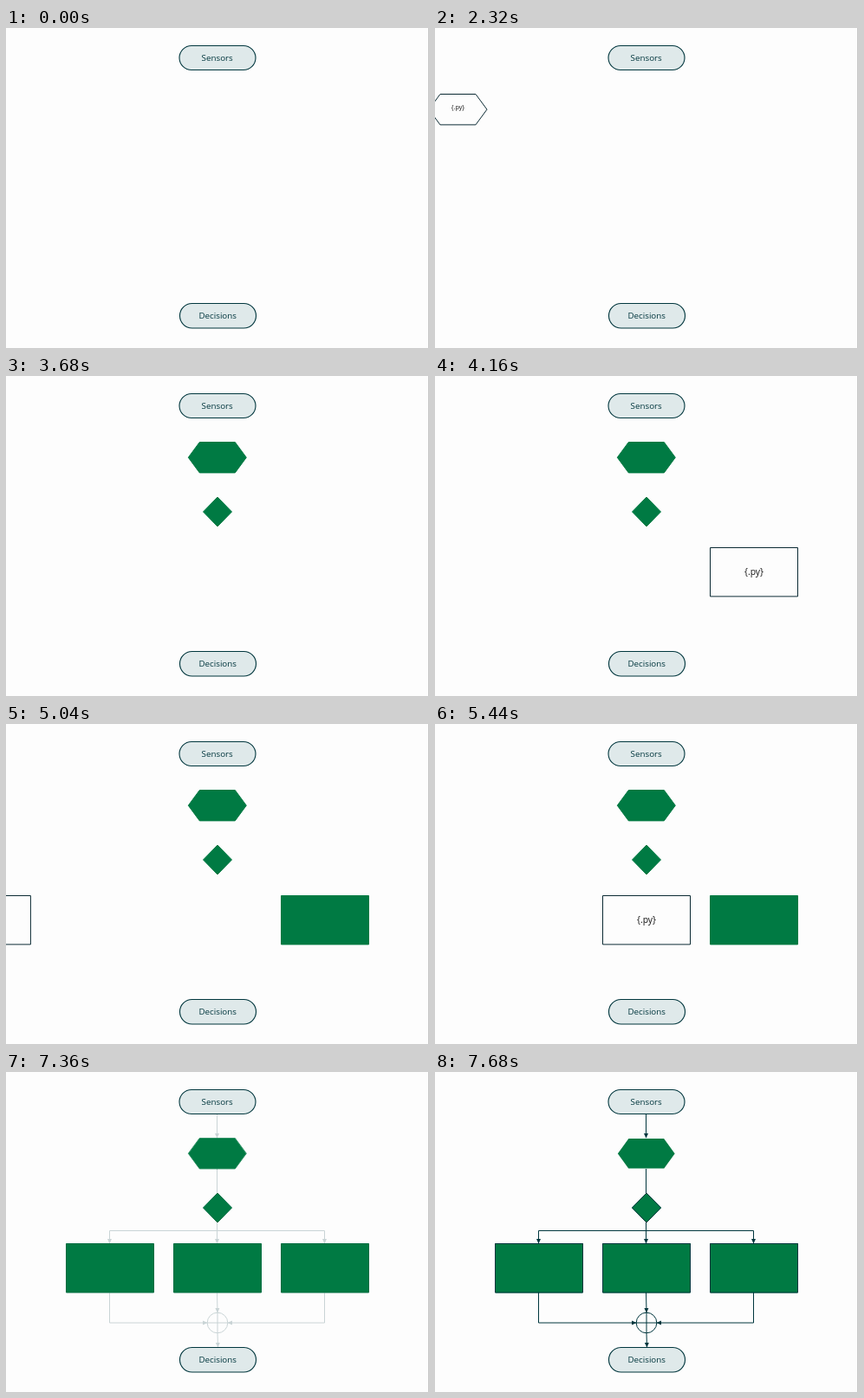
Recreate the animation shown at these times as an HTML page. Size 488 by 370 pixels, loop 8 s.

```html
<!DOCTYPE html>
<html lang="en">
<head>
<meta charset="utf-8">
<title>Sensors to decisions</title>
<style>
  html, body { margin: 0; width: 100%; height: 100%; overflow: hidden; background: #fdfdfd; }
  svg { display: block; }
  text { font-family: "Open Sans", "Noto Sans", sans-serif; text-anchor: middle; }
  .pill rect { fill: #dfe9ea; stroke: #00363d; stroke-width: 1.1; }
  .pill text { fill: #00363d; font-size: 9.8px; font-weight: 500; }
  .part path { fill: #fdfdfd; stroke: #0b2a33; }
  .part text { fill: #111; }
  .part.done path { fill: #007a43; stroke: #007a43; }
  .part.done text { display: none; }
  #links { fill: none; stroke: #00363d; }
  #links .rim { stroke: #fdfdfd; stroke-width: 1.4; }
  #head { fill: #00363d; stroke: none; }
</style>
</head>
<body>
<svg width="488" height="370" viewBox="0 0 488 370">
  <defs>
    <marker id="arrow" markerUnits="userSpaceOnUse" markerWidth="6" markerHeight="6" refX="5" refY="3" orient="auto">
      <path id="head" d="M0 .5L5.5 3L0 5.5z"/>
    </marker>
  </defs>
  <rect x="487" width="1" height="370" fill="#c8c8c8"/>
  <g class="pill">
    <rect x="200" y="20.5" width="88" height="28" rx="14"/>
    <text x="243.7" y="38">Sensors</text>
    <rect x="200.5" y="318.5" width="88" height="28.5" rx="14.2"/>
    <text x="244.2" y="336">Decisions</text>
  </g>
  <g id="parts"></g>
  <g id="links">
    <path class="rim" d="M210 94.3L223 76.3H264.500L277.500 94.3L264.500 112.300H223z"/>
    <path d="M244 140L260.500 157L244 174L227.500 157z"/>
    <path d="M69.500 198.500h101v56.500h-101zM193.500 198.500h101v56.500h-101zM317.500 198.500h101v56.500h-101z"/>
    <path d="M243.500 112V140M243.500 174V184M119.500 183.500H367.500"/>
    <g marker-end="url(#arrow)">
      <path d="M243.500 49V76"/>
      <path d="M119.500 183.500V198"/>
      <path d="M243.500 183.500V198"/>
      <path d="M367.500 183.500V198"/>
      <path d="M119.500 255V290H232"/>
      <path d="M367.500 255V290H256"/>
      <path d="M243.500 255L244 278"/>
      <path d="M244 302L244.500 318"/>
    </g>
    <circle cx="244" cy="290" r="11.800" fill="#fdfdfd"/>
    <path d="M232 290H256M244 278V302"/>
  </g>
</svg>
<script>
const LOOP = 8000, TICK = 80;
const BOX = 'M-50.5 -28.2H50.5V28.2H-50.5z';

// Each part flies in from the left edge, then turns green.
const parts = [
  { d: 'M-33.5 0L-20.5 -17.700H20.500L33.500 0L20.500 17.700H-20.500z', half: 34, x: 243.8, y: 94.2, size: 7.2, base: 0, from: 2231, to: 2640, done: 2800 },
  { d: 'M0 -17L16.500 0L0 17L-16.500 0z', half: 17, x: 244, y: 157, size: 7.2, base: 2, from: 2876, to: 3284, done: 3680 },
  { d: BOX, half: 51, x: 368, y: 226.7, size: 10.4, base: 3, from: 3744, to: 4152, done: 4880 },
  { d: BOX, half: 51, x: 244, y: 226.7, size: 10.4, base: 3, from: 5000, to: 5408, done: 5920 },
  { d: BOX, half: 51, x: 120, y: 226.7, size: 10.4, base: 3, from: 6080, to: 6480, done: 6880 }
];

const ramp = (t, from, to) => Math.min(1, Math.max(0, (t - from) / (to - from)));
const links = document.getElementById('links');
const layer = document.getElementById('parts');

layer.innerHTML = parts.map(p =>
  `<g class="part"><path d="${p.d}"/><text y="${p.base}" font-size="${p.size}">{.py}</text></g>`).join('');
parts.forEach((p, i) => p.node = layer.children[i]);

function draw(now) {
  const t = Math.floor(now % LOOP / TICK) * TICK;
  for (const p of parts) {
    const x = -p.half + (p.x + p.half) * ramp(t, p.from, p.to);
    p.node.setAttribute('transform', `translate(${x} ${p.y})`);
    p.node.setAttribute('visibility', t > p.from ? 'visible' : 'hidden');
    p.node.classList.toggle('done', t >= p.done);
  }
  links.setAttribute('opacity', ramp(t, 7280, 7680));
}

let start;
function frame() {
  const now = performance.now();
  start ??= now;
  draw(now - start);
  requestAnimationFrame(frame);
}
frame();
</script>
</body>
</html>
```
